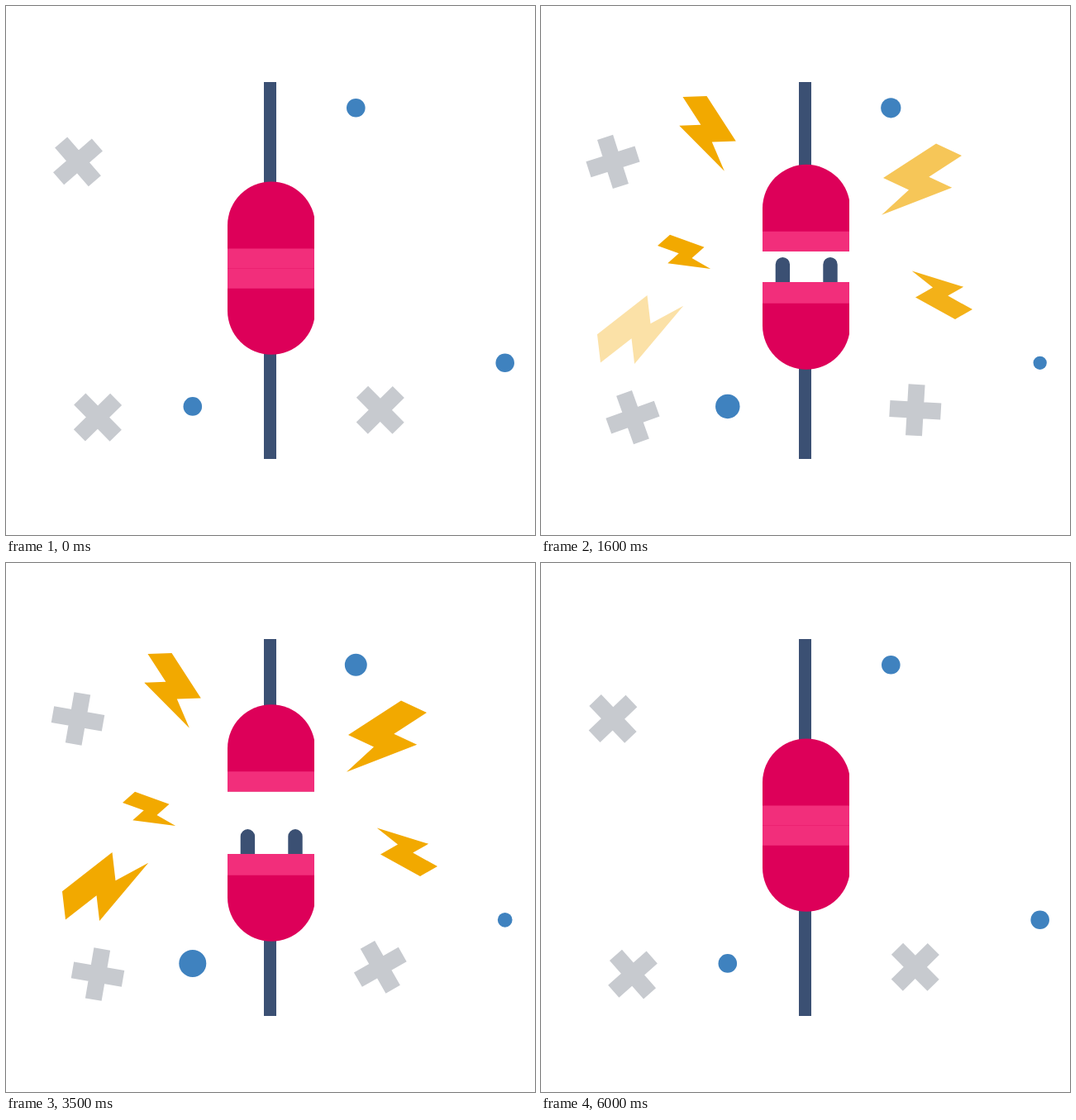
An HTML page that plays this animation: 640x640 px, repeating every 6100 ms.

```html
<!DOCTYPE html>
<html lang="en">
<head>
<meta charset="utf-8">
<title>Plug and sparks</title>
<style>
  html, body { margin: 0; width: 100%; height: 100%; overflow: hidden; background: #fff; }
  svg { display: block; width: 100vw; height: 100vh; }
</style>
</head>
<body>
<svg viewBox="0 0 640 640">
  <defs>
    <clipPath id="side"><rect x="268" y="0" width="105" height="640"/></clipPath>
  </defs>
  <g id="crosses" fill="#c7cacf"></g>
  <g id="dots" fill="#3f82bf"></g>
  <g id="bolts" fill="#f2a900"></g>
  <path d="M312 92h15V240h-15zM312 400h15V548h-15z" fill="#3b5073"/>
  <g id="lower">
    <path d="M292.4 330V294.7M350 330V294.7" stroke="#3b5073" stroke-width="17.4" stroke-linecap="round"/>
    <g clip-path="url(#side)">
      <path d="M268 316H374V368.7a53 53 0 0 1-106 0z" fill="#dd0059"/>
      <path d="M268 316h106v25.7H268z" fill="#f22e7b"/>
    </g>
  </g>
  <g id="upper" clip-path="url(#side)">
    <path d="M268 317.5V265.4a53 53 0 0 1 106 0V317.5z" fill="#dd0059"/>
    <path d="M268 293.4h106v24.1H268z" fill="#f22e7b"/>
  </g>
</svg>
<script>
const LOOP = 6100, STEP = 100;
const $ = id => document.getElementById(id);

function add(parent, tag, attrs) {
  const el = document.createElementNS("http://www.w3.org/2000/svg", tag);
  for (const k in attrs) el.setAttribute(k, attrs[k]);
  return $(parent).appendChild(el);
}

// eased 0..1 between two times
function ease(t, start, end) {
  const u = Math.min(1, Math.max(0, (t - start) / (end - start)));
  return (1 - Math.cos(Math.PI * u)) / 2;
}

// rises from a to b, falls from c to d
const pulse = (t, a, b, c, d) => ease(t, a, b) - ease(t, c, d);

// a part is a function of time in seconds that updates its own element
function cross(x, y, angle, speed) {
  const el = add("crosses", "path", { d: "M-31 0H31M0-31V31", stroke: "#c7cacf", "stroke-width": 20 });
  return t => el.setAttribute("transform", `translate(${x} ${y}) rotate(${angle + speed * t})`);
}

function dot(cx, cy, grow, peak) {
  const el = add("dots", "circle", { cx, cy });
  return t => el.setAttribute("r", 11.3 + grow * pulse(t, 0, peak, peak, 6));
}

// one zigzag on a unit grid, skewed into place by its short and long edges
function bolt(start, end, short, long, origin) {
  const el = add("bolts", "path", {
    d: "M0 0H1V1H0L-.26 1.64L-.9 .62H0z",
    transform: `matrix(${[...short, ...long, ...origin]})`
  });
  return t => el.setAttribute("opacity", pulse(t, start, start + 1, 4.5, end));
}

function slide(id, dy, end) {
  return t => $(id).setAttribute("transform", `translate(0 ${dy * pulse(t, 1.1, 2.1, 4.6, end)})`);
}

const parts = [
  cross(87, 188.4, 49, 14.55),
  cross(111, 497.6, 45.5, 15.5),
  cross(452.8, 488.8, 45.3, 30),
  dot(423.3, 123.3, 2.2, 3.85),
  dot(603.7, 431.8, -3.5, 2),
  dot(225.8, 484.4, 5.8, 2.85),
  bolt(0.1, 5.47, [15, -13.3], [41.5, 15], [141, 290]),
  bolt(0.5, 5.3, [29, -1], [35.3, 54.5], [171.5, 110]),
  bolt(0.8, 5.47, [-21, 12], [-48, -26.5], [522, 367]),
  bolt(1.0, 5.47, [-31, -14.5], [-64, 41.5], [509, 181]),
  bolt(1.2, 5.47, [-4, -34.3], [60.5, -47.3], [72, 431.5]),
  slide("upper", -41.1, 5.62),
  slide("lower", 36.1, 5.51)
];

function tick() {
  const ms = performance.now() % LOOP;
  const t = Math.floor(ms / STEP) * STEP / 1000;
  parts.forEach(update => update(t));
  requestAnimationFrame(tick);
}
tick();
</script>
</body>
</html>
```
